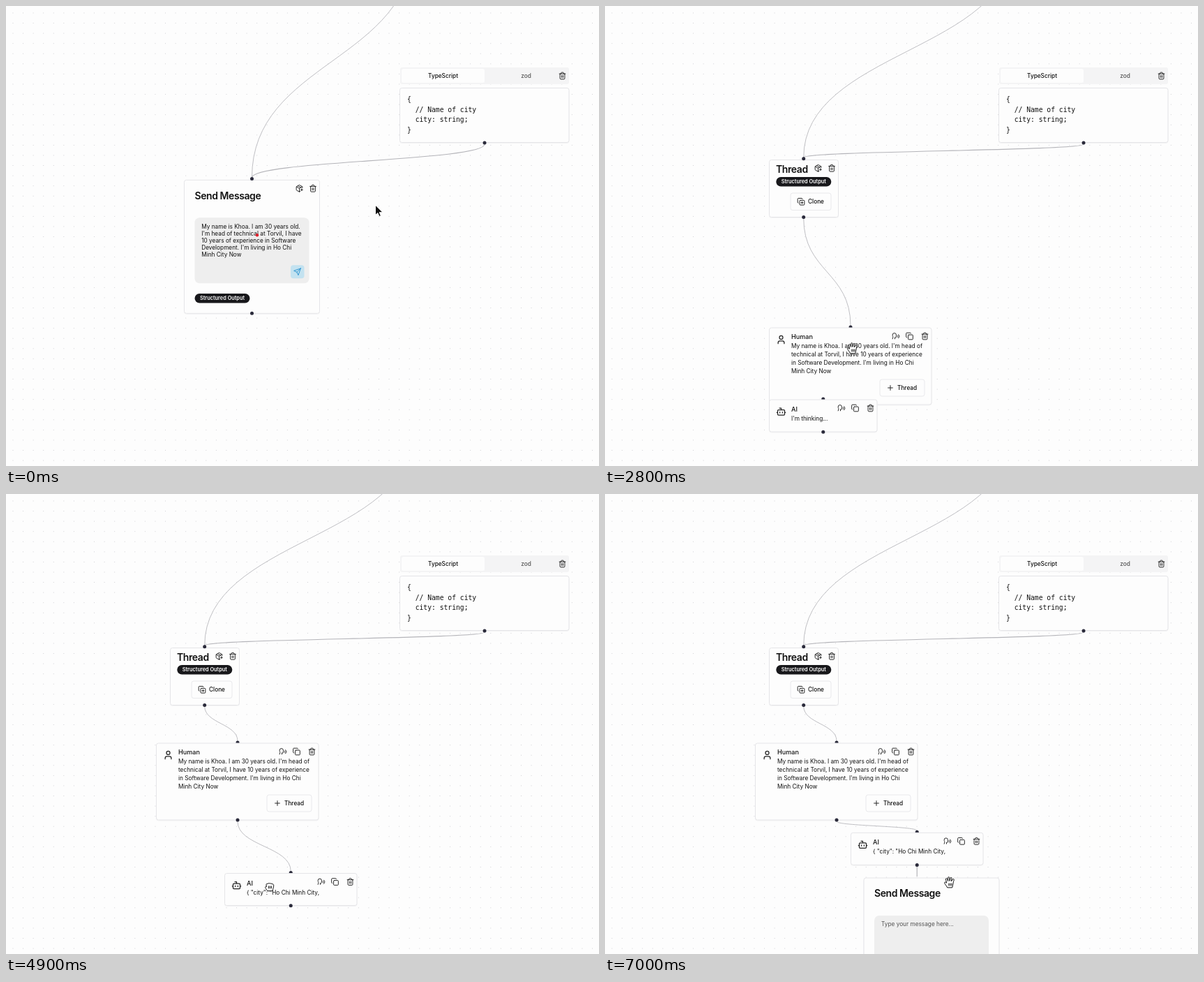
Recreate the animation shown at these times as an HTML page. Size 850 by 659 pixels, loop 7100 ms.

```html
<!DOCTYPE html>
<html lang="en">
<head>
<meta charset="utf-8">
<title>Thread flow</title>
<style>
html, body { margin: 0; width: 850px; height: 659px; overflow: hidden; background: #fdfdfd; }
svg { display: block; }
text { font: 8.27px Inter, sans-serif; fill: #111; white-space: pre; }
.title { font-size: 14px; font-weight: 600; letter-spacing: -.03em; }
.name { font-size: 9.1px; font-weight: 500; }
.btn { font-weight: 500; }
.pill { font-size: 7.35px; font-weight: 600; fill: #fff; text-anchor: middle; }
.code { font: 9.7px "DejaVu Sans Mono", monospace; }
.mid { text-anchor: middle; }
.dim { fill: #555; }
.edge { fill: none; stroke: #b4b4b9; }
.icon { fill: none; stroke: #222; stroke-width: 2; stroke-linecap: round; stroke-linejoin: round; }
.cursor { fill: #fff; stroke: #111; stroke-width: 1; stroke-linejoin: round; stroke-linecap: round; }
</style>
</head>
<body>
<svg width="850" height="659" viewBox="0 0 850 659">
  <defs>
    <pattern id="dots" x="2.7" y="2.7" width="14.57" height="14.57" patternUnits="userSpaceOnUse">
      <circle cx="7.28" cy="7.28" r=".55" fill="#c6c6ca"/>
    </pattern>
    <linearGradient id="glow"><stop stop-color="#cf6bc0"/><stop offset="1" stop-color="#f3a03c"/></linearGradient>
  </defs>
  <rect width="850" height="659" fill="url(#dots)"/>
  <g id="scene"></g>
</svg>
<script>
const LOOP = 7100, STEP = 100;
const scene = document.getElementById('scene');

const ICONS = {
  trash: 'M3 6h18M19 6v14c0 1-1 2-2 2H7c-1 0-2-1-2-2V6M8 6V4c0-1 1-2 2-2h4c1 0 2 1 2 2v2M10 11v6M14 11v6',
  box: 'M16 16h6M19 13v6M21 10V8a2 2 0 0 0-1-1.73l-7-4a2 2 0 0 0-2 0l-7 4A2 2 0 0 0 3 8v8a2 2 0 0 0 1 1.73l7 4a2 2 0 0 0 2 0l2-1.14M7.5 4.27l9 5.15M3.29 7 12 12l8.71-5M12 22V12',
  copy: 'M10 8h10a2 2 0 0 1 2 2v10a2 2 0 0 1-2 2H10a2 2 0 0 1-2-2V10a2 2 0 0 1 2-2M4 16c-1.1 0-2-.9-2-2V4c0-1.1.9-2 2-2h10c1.1 0 2 .9 2 2',
  user: 'M19 21v-2a4 4 0 0 0-4-4H9a4 4 0 0 0-4 4v2M12 3a4 4 0 1 0 0 8a4 4 0 1 0 0-8',
  bot: 'M12 8V4H8M6 8h12a2 2 0 0 1 2 2v8a2 2 0 0 1-2 2H6a2 2 0 0 1-2-2v-8a2 2 0 0 1 2-2M2 14h2M20 14h2M15 13v2M9 13v2',
  speech: 'M8.8 20v-4.1l1.9.2a2.3 2.3 0 0 0 2.16-2.1V8.3A5.37 5.37 0 0 0 2 8.25c0 2.8.66 3.95 1 4.8a7 7 0 0 1 .3 2.75L2 20M19.8 17.8a7.5 7.5 0 0 0 0-10.6M17 15a3.5 3.5 0 0 0 0-5',
  send: 'M22 2 11 13M22 2l-7 20-4-9-9-4 20-7z',
  plus: 'M5 12h14M12 5v14',
  spin: 'M21 12a9 9 0 1 1-6.219-8.56'
};
ICONS.clone = ICONS.copy + 'M15 12v6M12 15h6';

const CURSORS = {
  arrow: 'M-4-8v14l3.3-3 2.2 5 2.4-1-2.2-4.8h4.6z',
  open: 'M-3.5 7.5C-4.5 5-7 3-7.3 1C-7.3-.5-5.5-.3-4.3 1.2L-5.5-4C-5.6-5.8-3.8-6-3.3-4.4L-2.4-1.5V-6.2C-2.3-7.8-.4-7.8-.2-6.2L0-1.6L1-5.8C1.5-7.3 3.3-6.8 3-5.2L2.4-1.2L4.4-4C5.3-5.2 6.8-4.2 6.2-2.8C5 0 5 3.5 3.8 7.5ZM-1.2 2v3M.8 2v3M2.8 2v3',
  closed: 'M-3.5 6C-4.5 4-6.5 2.5-6.3.8C-6-.3-5 0-4.6.3L-5-2.5C-5-4.5-3-4.6-2.6-3.5C-2.3-5.2 0-5.2.3-3.9C.9-5 2.8-4.8 3-3.3C4-4.2 5.8-3.4 5.7-1.8C5.7 1.5 4.8 3 4 6ZM-1.5-.5v3M.5-.5v3M2.5-.5v3',
  finger: 'M-2.5 8C-4 5-6.5 2.5-6.7 1C-6.5-.3-4.8 0-3.5 1.6V-6.5C-3.4-8-1.4-8-1.3-6.5L-1.2-2C0-2.8 1.2-2.4 1.4-1.5C2.4-2.2 3.7-1.7 3.9-.8C5-1.3 6.2-.6 6.2.8C6.2 4 5 5.5 4.5 8ZM-1 2.5v3M1 2.5v3M3 2.5v3'
};

// Tracks: [time, values...]
const SEND = [[500, 255.5, 249.3], [1100, 235.5, 220.5]];
const HUMAN = [[2800, 235.5, 461], [3300, 230.5, 368], [3500, 226, 362], [3700, 215.5, 357]];
const AI = [[4500, 235.5, 564], [5100, 352.5, 533.3], [5400, 352.5, 533.3], [5700, 352.5, 485.3]];
const AI_WIDTH = [[4300, 154.5], [4700, 189.5]];
const REPLY = [[6600, 371, 602], [7000, 371, 550]];
const CURSOR = [
  [0, 533.5, 293.5, 'arrow'], [200, 370, 278, 'open'], [300, 370, 278, 'open'], [500, 328, 277, 'closed'],
  [1100, 308, 248, 'open'], [1800, 392, 350, 'finger'], [1900, 398, 359, 'finger'], [2300, 398, 362, 'open'],
  [2800, 355, 490, 'open'], [2900, 354, 471, 'closed'], [3300, 350, 393, 'closed'], [3500, 345.5, 387, 'closed'],
  [3700, 335, 382, 'open'], [4200, 323, 563, 'open'], [4500, 300, 583, 'closed'], [5100, 417, 552, 'open'],
  [5400, 417, 552, 'open'], [5500, 417, 536, 'closed'], [5700, 417, 504, 'open'], [5900, 573, 545, 'open'],
  [6500, 494, 608, 'open'], [6600, 494, 608, 'closed'], [7000, 494, 556, 'open']
];
const SENT = 2200, REPLIED = 2300, STREAM = 3900, DONE = 4800, NEXT = 5200;
const TOKENS = ['{', ' "', 'city":', ' "', 'Ho', ' Chi', ' Minh', ' City', ','];

function at(track, t) {
  const i = track.findIndex(k => k[0] > t);
  if (i === 0) return track[0].slice(1);
  if (i < 0) return track[track.length - 1].slice(1);
  const a = track[i - 1], b = track[i], p = (t - a[0]) / (b[0] - a[0]);
  return a.slice(1).map((v, j) => typeof v === 'number' ? v + (b[j + 1] - v) * p : v);
}

const text = (x, y, s, cls = '') => `<text x="${x}" y="${y}" class="${cls}">${s}</text>`;
const lines = (x, y, gap, list) => list.map((s, i) => text(x, y + i * gap, s)).join('');
const rect = (x, y, w, h, r, fill, stroke = 'none') =>
  `<rect x="${x}" y="${y}" width="${w}" height="${h}" rx="${r}" fill="${fill}" stroke="${stroke}"/>`;
const dot = (x, y, r = 2.5, fill = '#2b2b3b') => `<circle cx="${x}" cy="${y}" r="${r}" fill="${fill}"/>`;
const card = (x, y, w, h) => rect(x, y + 1, w, h, 3, 'none', '#f3f3f4') + rect(x, y, w, h, 3, '#fdfdfd', '#e5e5e8');
const icon = (name, x, y, size = 11.6, turn = 0, style = '') =>
  `<path class="icon" style="${style}" d="${ICONS[name]}" transform="translate(${x} ${y}) rotate(${turn}) scale(${size / 24}) translate(-12 -12)"/>`;
const pill = (x, y) => rect(x, y, 79, 13.5, 6.75, '#18181b') + text(x + 39.5, y + 9.4, 'Structured Output', 'pill');

function edge(x1, y1, x2, y2, width = .85) {
  const d = y2 - y1, c = d >= 0 ? d / 2 : 6.25 * Math.sqrt(-d);
  return `<path class="edge" stroke-width="${width}" d="M${x1} ${y1}C${x1} ${y1 + c} ${x2} ${y2 - c} ${x2} ${y2}"/>`;
}

function schema() {
  return rect(565, 88, 242, 24, 3, '#f4f4f5') + rect(567, 90, 119, 20, 2.5, '#fdfdfd')
    + text(626.5, 103, 'TypeScript', 'btn mid') + text(745.5, 103, 'zod', 'btn mid dim') + icon('trash', 797.5, 100)
    + card(564.5, 117.5, 242.5, 78)
    + [['{', 0], ['// Name of city', 1], ['city: string;', 1], ['}', 0]]
      .map(([s, tab], i) => text(575 + tab * 11.7, 137 + i * 14.6, s, 'code')).join('')
    + dot(686, 196);
}

function composer(x, y) {
  return card(x, y, 194, 191) + text(x + 15, y + 27.3, 'Send Message', 'title')
    + rect(x + 15, y + 54, 164, 94, 7, '#eeeeee');
}

function sendCard(x, y) {
  return composer(x, y) + icon('box', x + 165, y + 12) + icon('trash', x + 184.5, y + 12)
    + lines(x + 24.7, y + 69.3, 10, ['My name is Khoa. I am 30 years old.', "I'm head of technical at Torvil, I have",
      '10 years of experience in Software', "Development. I'm living in Ho Chi", 'Minh City Now'])
    + dot(x + 104.5, y + 79, 2.2, '#e0202c')
    + rect(x + 152.5, y + 122, 19.5, 19, 4, '#c3e2f0') + icon('send', x + 162, y + 131.5, 11.6, 0, 'stroke:#2d93cf')
    + pill(x + 15, y + 162.7) + dot(x + 97, y - 1.7) + dot(x + 97, y + 191);
}

function threadCard() {
  return card(235.5, 220.5, 99, 82) + text(245, 238.6, 'Thread', 'title')
    + icon('box', 305.5, 232.3) + icon('trash', 325, 232.3) + pill(245.3, 245)
    + rect(266, 268, 58, 24.5, 3, '#fdfdfd', '#e9e9ec') + icon('clone', 281, 280.3) + text(291, 283.3, 'Clone', 'btn')
    + dot(284.7, 218.8) + dot(284.7, 302.5);
}

const tools = (x, y, w) => icon('speech', x + w - 51, y + 12) + icon('copy', x + w - 31.5, y + 12) + icon('trash', x + w - 9.5, y + 12);

function humanCard(x, y) {
  return dot(x + 116.5, y - 1) + card(x, y, 232.5, 110) + icon('user', x + 17, y + 17, 15)
    + text(x + 31.5, y + 16.3, 'Human', 'name') + tools(x, y, 232.5)
    + lines(x + 31.5, y + 29.2, 12, ["My name is Khoa. I am 30 years old. I'm head of",
      'technical at Torvil, I have 10 years of experience', "in Software Development. I'm living in Ho Chi", 'Minh City Now'])
    + rect(x + 158.5, y + 74, 64, 24, 3, '#fdfdfd', '#e9e9ec') + icon('plus', x + 173.5, y + 86)
    + text(x + 183.5, y + 89, 'Thread', 'btn') + dot(x + 116.5, y + 110);
}

function aiCard(x, y, w, t) {
  const busy = t >= STREAM && t < DONE;
  const said = t < STREAM ? "I'm thinking..." : TOKENS.slice(0, Math.floor((t - STREAM) / 100) + 1).join('');
  return dot(x + w / 2, y - 1) + card(x, y, w, 46)
    + (busy ? `<path d="M${x + 59} ${y + .5}h-56a3 3 0 0 0-3 3v39a3 3 0 0 0 3 3h56" fill="none" stroke="url(#glow)" stroke-width="1.3"/>` : '')
    + (busy ? icon('spin', x + 17, y + 17.5, 15, 170 + (t - 4200) * .36) : icon('bot', x + 17, y + 17, 15))
    + text(x + 31.5, y + 17, 'AI', 'name') + tools(x, y, w) + text(x + 31.5, y + 30, said) + dot(x + w / 2, y + 46.3);
}

function draw(t) {
  const sent = t >= SENT, replied = t >= REPLIED, next = t >= NEXT;
  const [sx, sy] = at(SEND, t), [hx, hy] = at(HUMAN, t), [ax, ay] = at(AI, t), [rx, ry] = at(REPLY, t);
  const [aw] = at(AI_WIDTH, t), [cx, cy, shape] = at(CURSOR, t);
  const topX = sent ? 284.7 : sx + 97, topY = sy - 3.5, hm = hx + 116.5, am = ax + aw / 2;
  let s = edge(583, -88, topX, topY) + edge(686, 198, topX, topY, 1.1);
  if (replied) s += edge(284.7, 304, hm, hy - 3) + edge(hm, hy + 112, am, ay - 3);
  if (next) s += edge(am, ay + 48, am, ry - 2, 1.2);
  s += schema() + (sent ? threadCard() : sendCard(sx, sy));
  if (replied) s += humanCard(hx, hy) + aiCard(ax, ay, aw, t);
  if (next) s += composer(rx, ry) + text(rx + 25, ry + 69.3, 'Type your message here...', 'dim');
  const look = shape === 'arrow' ? 'fill:#111;stroke:#fff' : '';
  scene.innerHTML = s + `<path class="cursor" style="${look}" d="${CURSORS[shape]}" transform="translate(${cx} ${cy})"/>`;
}

const start = performance.now();
let shown = -1;
function tick() {
  const t = Math.floor((performance.now() - start) % LOOP / STEP) * STEP;
  if (t !== shown) draw(shown = t);
  requestAnimationFrame(tick);
}
tick();
</script>
</body>
</html>
```
